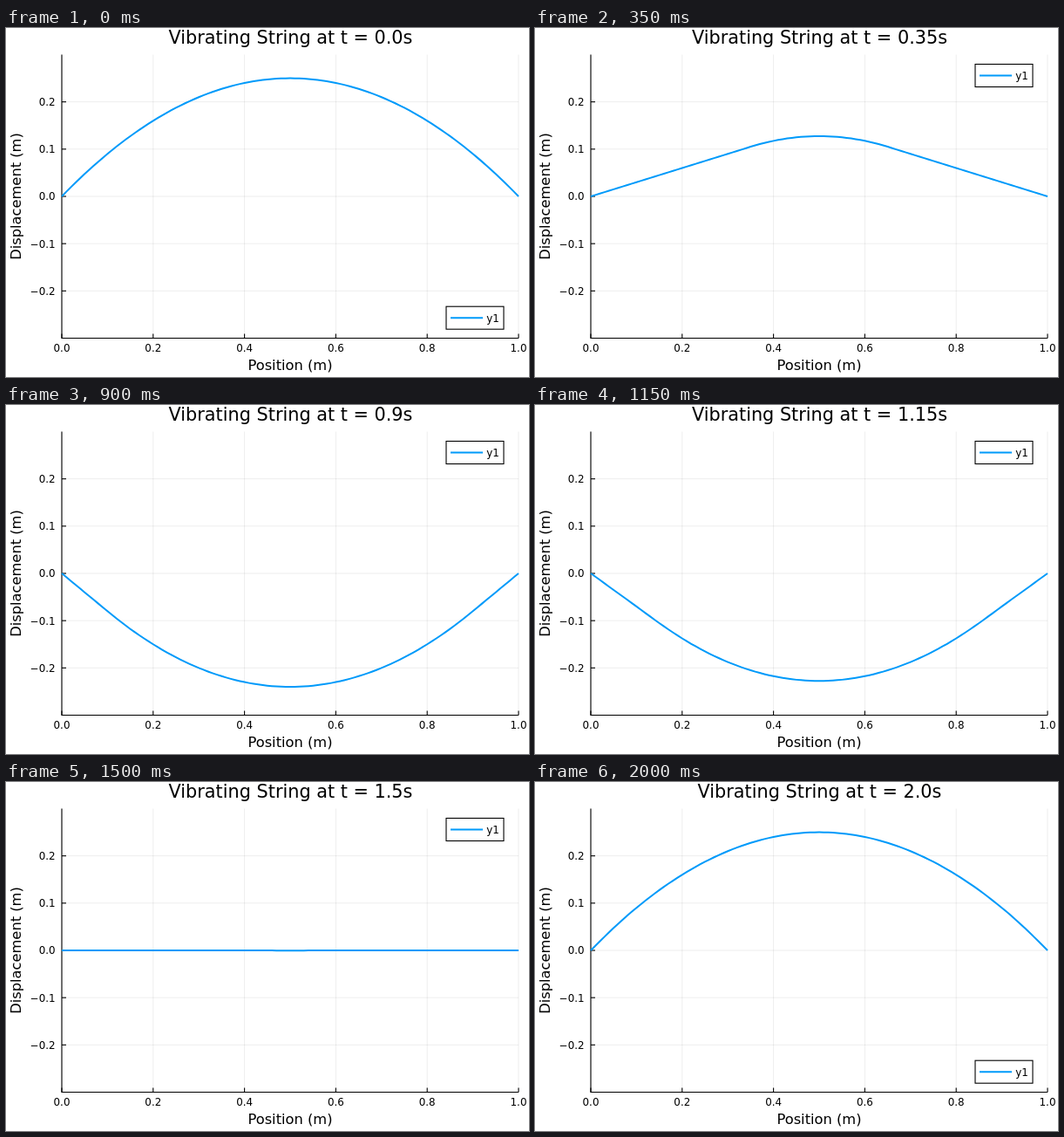
An HTML page with a canvas that plays this animation: 600x400 px, repeating every 2.05 s.

```html
<!DOCTYPE html>
<html lang="en">
<head>
<meta charset="utf-8">
<title>Vibrating String</title>
<style>
html, body { margin: 0; width: 100%; height: 100%; overflow: hidden; background: #fff; }
canvas { display: block; width: 600px; height: 400px; }
</style>
</head>
<body>
<canvas id="stage" width="600" height="400"></canvas>
<script>
const ctx = document.getElementById('stage').getContext('2d');
const LEFT = 64, RIGHT = 588, TOP = 30.5, BOTTOM = 355.5;
const STEP = 50, STEPS = 41, CELLS = 100;
const BLUE = '#009afa';

const px = x => LEFT + x * (RIGHT - LEFT);
const py = y => BOTTOM - (y + 0.3) / 0.6 * (BOTTOM - TOP);

// String released from x(1 - x), fixed at both ends, on a grid of CELLS cells.
function shape(t) {
  const ys = new Array(CELLS + 1).fill(0);
  for (let n = 1; n < CELLS; n += 2) {
    const w = 2 * CELLS * Math.sin(n * Math.PI / (2 * CELLS));
    const amp = 8 / (n * Math.PI) ** 3 * Math.cos(w * t);
    for (let i = 1; i < CELLS; i++) ys[i] += amp * Math.sin(n * Math.PI * i / CELLS);
  }
  return ys;
}

function line(points, color, width) {
  ctx.beginPath();
  points.forEach(([x, y]) => ctx.lineTo(x, y));
  ctx.strokeStyle = color;
  ctx.lineWidth = width;
  ctx.stroke();
}

function text(str, x, y, size, align = 'center') {
  ctx.font = `${size}px "DejaVu Sans", sans-serif`;
  ctx.textAlign = align;
  ctx.fillStyle = '#000';
  ctx.fillText(str, x, y);
}

function axes() {
  const xs = [0, 0.2, 0.4, 0.6, 0.8, 1];
  const ys = [-0.2, -0.1, 0, 0.1, 0.2];
  const grid = 'rgba(0,0,0,0.1)';
  xs.forEach(x => line([[px(x), TOP], [px(x), BOTTOM]], grid, 0.7));
  ys.forEach(y => line([[LEFT, py(y)], [RIGHT, py(y)]], grid, 0.7));
  line([[LEFT, TOP], [LEFT, BOTTOM], [RIGHT, BOTTOM]], '#000', 1.1);
  xs.forEach(x => {
    line([[px(x), BOTTOM], [px(x), BOTTOM - 5]], '#000', 1.1);
    text(x.toFixed(1), px(x), 371.4, 11.9);
  });
  ys.forEach(y => {
    line([[LEFT, py(y)], [LEFT + 5, py(y)]], '#000', 1.1);
    text(y.toFixed(1).replace('-', '\u2212'), 56.6, py(y) + 4.4, 11.9, 'right');
  });
  text('Position (m)', 326, 392, 16.3);
  ctx.save();
  ctx.translate(16.5, 193);
  ctx.rotate(-Math.PI / 2);
  text('Displacement (m)', 0, 0, 16.3);
  ctx.restore();
}

function legend(top) {
  ctx.fillStyle = '#fff';
  ctx.fillRect(505, top, 66, 26);
  ctx.strokeStyle = '#000';
  ctx.lineWidth = 1.1;
  ctx.strokeRect(505, top, 66, 26);
  line([[510, top + 13], [547, top + 13]], BLUE, 2);
  text('y1', 551.2, top + 17.3, 11.9, 'left');
}

function draw(k) {
  const t = k / 20;
  const ys = shape(t);
  ctx.clearRect(0, 0, 600, 400);
  ctx.fillStyle = '#fff';
  ctx.fillRect(0, 0, 600, 400);
  axes();
  line(ys.map((y, i) => [px(i / CELLS), py(y)]), BLUE, 2);
  // The legend drops down when the string enters the top right corner.
  legend(ys[CELLS * 0.75] > 0.15 ? 319.2 : 41.5);
  const label = Number.isInteger(k / 2) ? t.toFixed(1) : t.toFixed(2);
  text(`Vibrating String at t = ${label}s`, 326.5, 18, 20.8);
}

let last = -1;
const start = performance.now();
function tick() {
  const k = Math.floor((performance.now() - start) / STEP) % STEPS;
  if (k !== last) draw(last = k);
  requestAnimationFrame(tick);
}
tick();
</script>
</body>
</html>
```
